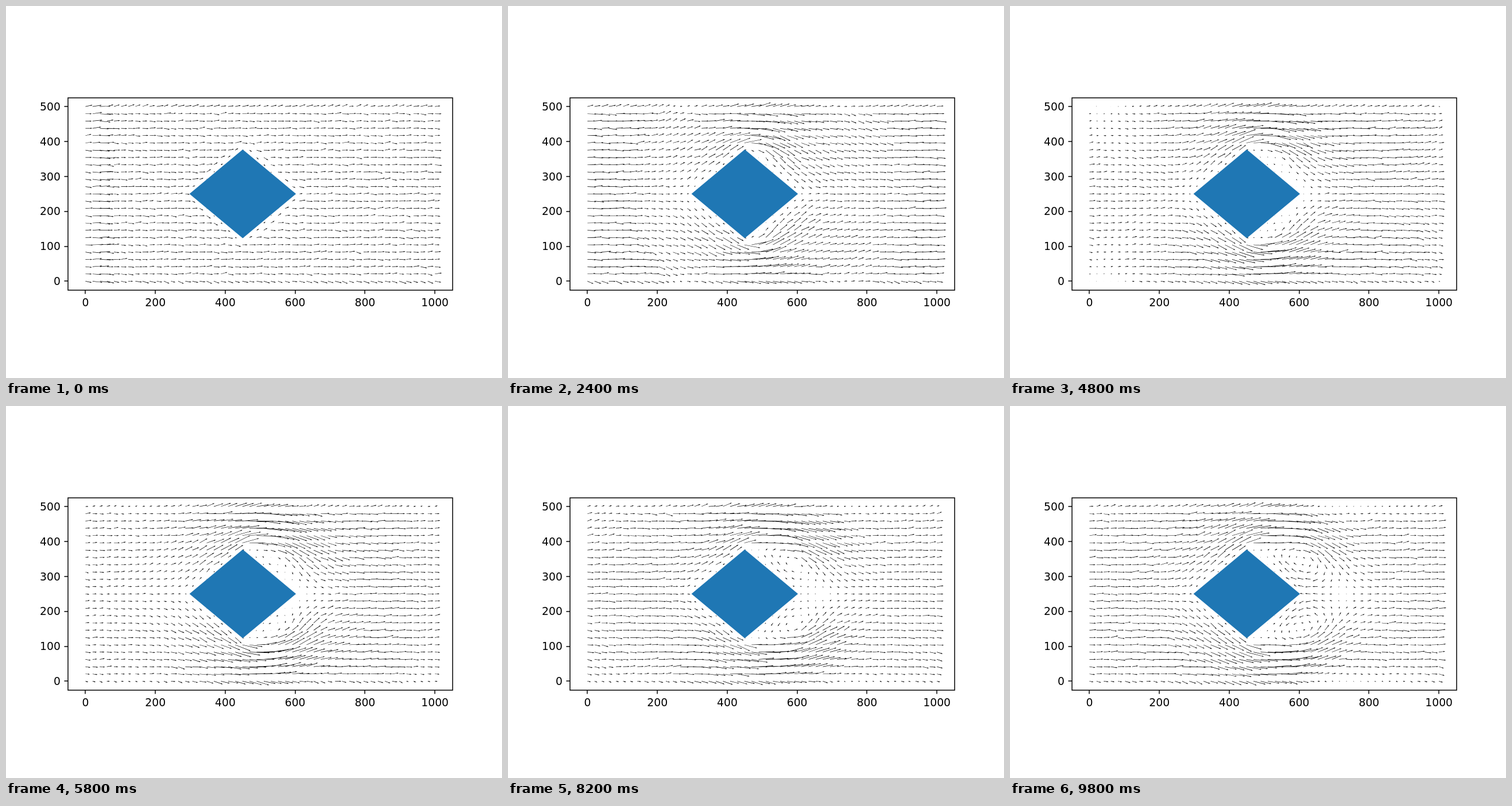
Animation of 864 by 648 pixels, one loop 10 s. Source, as an HTML page:

```html
<!DOCTYPE html>
<html lang="en">
<head>
<meta charset="utf-8">
<title>Flow around a diamond</title>
<style>
  html, body { margin: 0; width: 100%; height: 100%; overflow: hidden; background: #fff; }
  svg { display: block; width: 864px; height: 648px; }
  text { font: 18.75px "DejaVu Sans", sans-serif; }
</style>
</head>
<body>
<svg viewBox="0 0 864 648">
  <path id="arrows"/>
  <path id="diamond" fill="#1f77b4" stroke="#1f77b4" stroke-width="1.875"/>
  <path id="axes" fill="none" stroke="#000" stroke-width="1.5"/>
  <g id="labels"></g>
</svg>
<script>
const FRAMES = 50, FRAME_MS = 200, STEPS = 7;
const SCALE = 669.6 / 1100;
const px = x => 138.44 + x * SCALE;
const py = y => 479.42 - y * SCALE;
const byId = id => document.getElementById(id);

// Axes, ticks and labels
const LEFT = 108, RIGHT = 778, TOP = 160, BOTTOM = 495, TICK = 6.56;
let axes = `M${LEFT} ${TOP}H${RIGHT}V${BOTTOM}H${LEFT}Z`, labels = '';
const label = (x, y, anchor, value) => {
  labels += `<text x="${x}" y="${y}" text-anchor="${anchor}">${value}</text>`;
};
for (let v = 0; v <= 1000; v += 200) {
  axes += `M${Math.round(px(v))} ${BOTTOM}v${TICK}`;
  label(px(v), 522.5, 'middle', v);
}
for (let v = 0; v <= 500; v += 100) {
  axes += `M${LEFT} ${Math.round(py(v))}h${-TICK}`;
  label(LEFT - 2 * TICK, py(v) + 6.8, 'end', v);
}
byId('axes').setAttribute('d', axes);
byId('labels').innerHTML = labels;
byId('diamond').setAttribute('d',
  `M${px(300)} ${py(250)}L${px(450)} ${py(375)}L${px(600)} ${py(250)}L${px(450)} ${py(125)}Z`);

// Lattice Boltzmann flow: periodic in x, rough walls in y, no slip on the diamond
const W = 200, H = 100, N = W * H;
const SPEED = 0.17, TAU = 0.78, FORCE = 6e-5;
const INLET = 6, INLET_PULL = 0.04, WALL_DRAG = 0.02;
const EX = [0, 1, 0, -1, 0, 1, -1, -1, 1];
const EY = [0, 0, 1, 0, -1, 1, 1, -1, -1];
const OPPOSITE = [0, 3, 4, 1, 2, 7, 8, 5, 6];
const MIRROR = [0, 1, 4, 3, 2, 8, 7, 6, 5];
const WEIGHT = EX.map((ex, i) => [4 / 9, 1 / 9, 1 / 36][Math.abs(ex) + Math.abs(EY[i])]);

const velX = new Float64Array(N), velY = new Float64Array(N);
const solid = new Uint8Array(N), link = new Int32Array(9 * N);
let dist = new Float64Array(9 * N), next = new Float64Array(9 * N);

const equilibrium = (i, rho, u, v) => {
  const e = EX[i] * u + EY[i] * v;
  return WEIGHT[i] * rho * (1 + 3 * e + 4.5 * e * e - 1.5 * (u * u + v * v));
};

for (let c = 0; c < N; c++) {
  const x = c % W, y = Math.floor(c / W);
  solid[c] = Math.abs(x + 0.5 - 90) / 30 + Math.abs(y + 0.5 - 50) / 25 < 1 ? 1 : 0;
}
// Each population is pulled from the place that streams into it
for (let i = 0; i < 9; i++) {
  for (let c = 0; c < N; c++) {
    const x = (c % W - EX[i] + W) % W, row = Math.floor(c / W), y = row - EY[i];
    const wall = y < 0 || y >= H;
    const from = (wall ? row : y) * W + x;
    link[i * N + c] = solid[c] ? i * N + c
      : solid[from] ? OPPOSITE[i] * N + c
      : (wall ? MIRROR[i] : i) * N + from;
    dist[i * N + c] = equilibrium(i, 1, solid[c] ? 0 : SPEED, 0);
  }
}

function force(c, u) {
  if (c < W || c >= N - W) return -WALL_DRAG * u;
  return c % W < INLET ? INLET_PULL * (SPEED - u) : FORCE;
}

function step() {
  for (let c = 0; c < N; c++) {
    if (solid[c]) continue;
    let rho = 0, u = 0, v = 0;
    for (let i = 0; i < 9; i++) {
      const d = dist[i * N + c];
      rho += d;
      u += d * EX[i];
      v += d * EY[i];
    }
    velX[c] = u /= rho;
    velY[c] = v /= rho;
    const pushed = u + TAU * force(c, u);
    for (let i = 0; i < 9; i++) {
      const k = i * N + c;
      dist[k] += (equilibrium(i, rho, pushed, v) - dist[k]) / TAU;
    }
  }
  for (let k = 0; k < 9 * N; k++) next[k] = dist[link[k]];
  [dist, next] = [next, dist];
}

// Arrows: one for each block of cells
const COLS = 50, ROWS = 25, BLOCK = 4, GAIN = 15 / SPEED;
const SHAFT = 0.67;
let seed = 4711;
const random = () => (seed = seed * 16807 % 2147483647) / 2147483647;
const noise = () => (random() + random() + random() + random() - 2) * 1.9;

function arrow(x, y, u, v) {
  const length = Math.hypot(u, v);
  if (length < 0.3) return '';
  const size = SHAFT * Math.min(1, length / (5 * SHAFT));
  const c = u / length, s = v / length;
  const at = (a, b) => `${(x + a * c + b * s).toFixed(2)} ${(y - a * s + b * c).toFixed(2)}`;
  const neck = length - 4.5 * size, barb = length - 5 * size;
  return 'M' + [
    at(0, size / 2), at(neck, size / 2), at(barb, 1.5 * size), at(length, 0),
    at(barb, -1.5 * size), at(neck, -size / 2), at(0, -size / 2)
  ].join('L') + 'Z';
}

function drawField(k) {
  const gain = GAIN * (1 - 0.32 * Math.exp(-k / 2));
  let path = '';
  for (let row = 0; row < ROWS; row++) {
    for (let col = 0; col < COLS; col++) {
      let u = 0, v = 0, fluid = 0;
      for (let j = 0; j < BLOCK * BLOCK; j++) {
        const c = (row * BLOCK + (j >> 2)) * W + col * BLOCK + j % BLOCK;
        if (solid[c]) continue;
        u += velX[c] / 16;
        v += velY[c] / 16;
        fluid += 1 / 16;
      }
      const x = px(col * 1000 / (COLS - 1)), y = py(row * 500 / (ROWS - 1));
      const pulse = 1 + 0.9 * Math.exp(-k / 3 - ((x - 160 - 13 * k) / 14) ** 2);
      const edge = row === 0 ? -1 : row === ROWS - 1 ? 1 : 0;
      const strength = Math.min(1, Math.hypot(u, v) / SPEED + 0.15) * fluid;
      v = (v + 0.25 * edge * Math.abs(u)) * gain + noise() * strength;
      u = u * gain * pulse + noise() * strength;
      if (fluid > 0) path += arrow(x, y, u, v);
    }
  }
  return path;
}

const paths = [];
for (let k = 0; k < FRAMES; k++) {
  for (let n = 0; n < STEPS; n++) step();
  paths.push(drawField(k));
}

const arrows = byId('arrows');
const start = performance.now();
let shown = -1;
function render() {
  const k = Math.floor((performance.now() - start) / FRAME_MS) % FRAMES;
  if (k !== shown) arrows.setAttribute('d', paths[shown = k]);
  requestAnimationFrame(render);
}
render();
</script>
</body>
</html>
```
